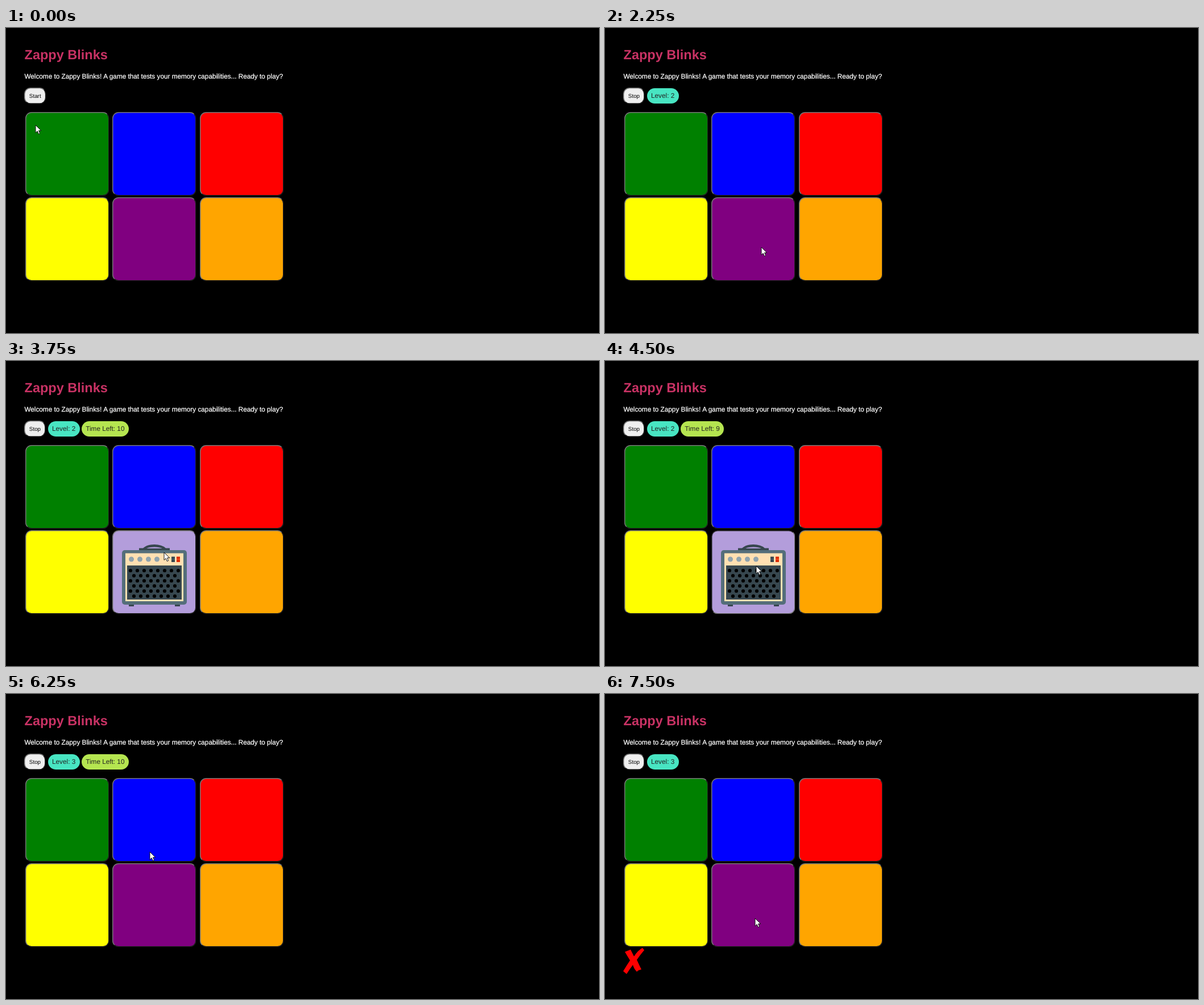
An HTML page for the animation above (8 s loop, 1043x537 px).

```html
<!DOCTYPE html>
<html lang="en">
<head>
<meta charset="utf-8">
<title>Zappy Blinks</title>
<style>
  html, body { margin: 0; width: 100%; height: 100%; overflow: hidden; background: #000; }
  body {
    position: relative;
    font: 11.77px "Liberation Sans", Arial, sans-serif;
    text-rendering: geometricPrecision;
    cursor: default;
  }
  body > * { position: absolute; margin: 0; white-space: nowrap; }
  h1 { left: 32.6px; top: 31.5px; font-size: 23.5px; line-height: 30px; color: #c83264; }
  p { top: 79px; line-height: 14px; color: #fff; -webkit-text-stroke: .25px #fff; }
  .box {
    box-sizing: border-box;
    border: 2px outset rgb(118, 118, 118);
    border-radius: 15px;
    transform: scale(.7375);
    transform-origin: 0 0;
  }
  .tile { width: 200px; height: 200px; }
  .pressed { border-style: inset; }
  #toggle {
    left: 32px; top: 105px; height: 38.5px; padding: 0 10px;
    font-size: 13.333px; line-height: 36px; background: #efefef; color: #000;
  }
  .pill { top: 105.5px; padding: 0 7.35px; line-height: 27.5px; border-radius: 14px; color: #222; }
  #level { left: 73.7px; background: #48e5c2; }
  #time { left: 132.9px; background: #b5e550; }
  svg { left: 0; top: 0; }
</style>
</head>
<body>
<h1>Zappy Blinks</h1>
<p style="left:32.4px">Welcome to Zappy Blinks!</p>
<p style="right:555.8px">A game that tests your memory capabilities... Ready to play?</p>
<div id="toggle" class="box">Start</div>
<div id="level" class="pill"></div>
<div id="time" class="pill"></div>
<svg id="art" width="1043" height="537" viewBox="0 0 1043 537">
  <g id="amp">
    <path d="M234 333V329.5H241Q248 323 261 323T281 329.5H288V333ZM247 330H275Q270 327.5 261 327.5T247 330Z" fill="#37474f" fill-rule="evenodd"/>
    <path d="M216 428h9v4h-9zM297 428h9v4h-9z" fill="#37474f"/>
    <rect x="204" y="333" width="114" height="96" rx="5" fill="#546e7a"/>
    <rect x="210" y="338.5" width="102" height="84.5" fill="#ffe0b2"/>
    <rect x="213" y="360" width="96" height="60" fill="#37474f"/>
    <g id="knobs" fill="#90a4ae"></g>
    <g id="holes" fill="#000"></g>
    <path d="M291 344.5h6v9.5h-6z" fill="#37474f"/>
    <path d="M300 344.5h6v9.5h-6z" fill="#dd2c00"/>
    <path d="M291 349h6" stroke="#546e7a"/>
    <path d="M300 349h6" stroke="#ff6e40"/>
  </g>
  <path id="cross" fill="#f00" d="M35 454L45 450Q48 456 51 462Q58 451 66 447L69 451Q62 459 56 468Q60 477 64 485Q58 486 56 489Q51 484 49 477Q43 485 38 493L32 488Q38 478 44 469Q39 461 35 454Z"/>
  <path id="pointer" fill="#fff" stroke="#000" stroke-width=".9" d="M0 0V13.5L3.2 10.6L5.3 15.6L7.6 14.6L5.6 9.7H9.8Z"/>
</svg>
<script>
const LOOP = 8000, STEP = 250;
const $ = id => document.getElementById(id);
const art = $('art');

const colors = ['green', 'blue', 'red', 'yellow', 'purple', 'orange'];
const tiles = colors.map((color, i) => {
  const tile = document.createElement('div');
  tile.className = 'box tile';
  tile.style.left = 33.6 + 153.7 * (i % 3) + 'px';
  tile.style.top = (i < 3 ? 147.8 : 298) + 'px';
  tile.style.background = color;
  document.body.insertBefore(tile, art);
  return tile;
});
const red = tiles[2], purple = tiles[4];

function dot(parent, cx, cy, r) {
  const c = document.createElementNS(art.namespaceURI, 'circle');
  for (const [k, v] of Object.entries({ cx, cy, r })) c.setAttribute(k, v);
  parent.appendChild(c);
}
for (let i = 0; i < 4; i++) dot($('knobs'), 220.5 + 15 * i, 349, 4.5);
for (let row = 0; row < 6; row++) {
  const odd = row % 2;
  for (let i = 0; i < 8 - odd; i++) dot($('holes'), 219 + 6 * odd + 12 * i, 369 + 9 * row, 3.1);
}

// pointer path: time, x, y
const path = [
  [0, 52, 171], [500, 50, 118], [1000, 248, 238], [1250, 251, 241], [1500, 251, 241],
  [2000, 284, 370], [2250, 275, 386], [2750, 284, 366], [3750, 278, 337],
  [4500, 266, 361], [5250, 258, 369], [5500, 257, 370], [6000, 255, 330],
  [6500, 251, 226], [6750, 250, 218], [7250, 262, 370], [7500, 264, 395], [LOOP, 264, 395]
];
function pointerAt(t) {
  const i = path.findIndex(p => p[0] > t);
  const [t0, x0, y0] = path[i - 1], [t1, x1, y1] = path[i];
  const k = (t - t0) / (t1 - t0);
  return [x0 + (x1 - x0) * k, y0 + (y1 - y0) * k];
}

// value of the last entry that has begun
const latest = (list, t) => list.reduce((v, [at, next]) => t >= at ? next : v, '');
const levels = [[500, 1], [2000, 2], [5250, 3]];
const clock = [[1250, 10], [2000, ''], [3750, 10], [4250, 9], [5250, ''], [6250, 10], [6500, 9], [7500, '']];
const within = (t, spans) => spans.some(([a, b]) => t >= a && t < b);

function label(el, name, value) {
  el.style.display = value === '' ? 'none' : 'block';
  el.textContent = name + ': ' + value;
}
const show = (el, on) => { el.style.display = on ? '' : 'none'; };

function draw(t) {
  $('toggle').textContent = t < 500 ? 'Start' : 'Stop';
  label($('level'), 'Level', latest(levels, t));
  label($('time'), 'Time Left', latest(clock, t));

  const pressed = within(t, [[4500, 4750], [5000, 5250]]);
  const lit = pressed || within(t, [[3000, 3500], [3750, 4250]]);
  purple.classList.toggle('pressed', pressed);
  purple.style.background = lit ? '#b39ddb' : 'purple';
  red.style.background = within(t, [[5750, 6000]]) ? '#ef9a9a' : 'red';

  show($('amp'), lit);
  show($('cross'), t >= 7500);
  $('pointer').setAttribute('transform', `translate(${pointerAt(t)})`);
}

const start = performance.now();
function tick() {
  const t = (performance.now() - start) % LOOP;
  draw(Math.floor(t / STEP) * STEP);
  requestAnimationFrame(tick);
}
tick();
</script>
</body>
</html>
```
